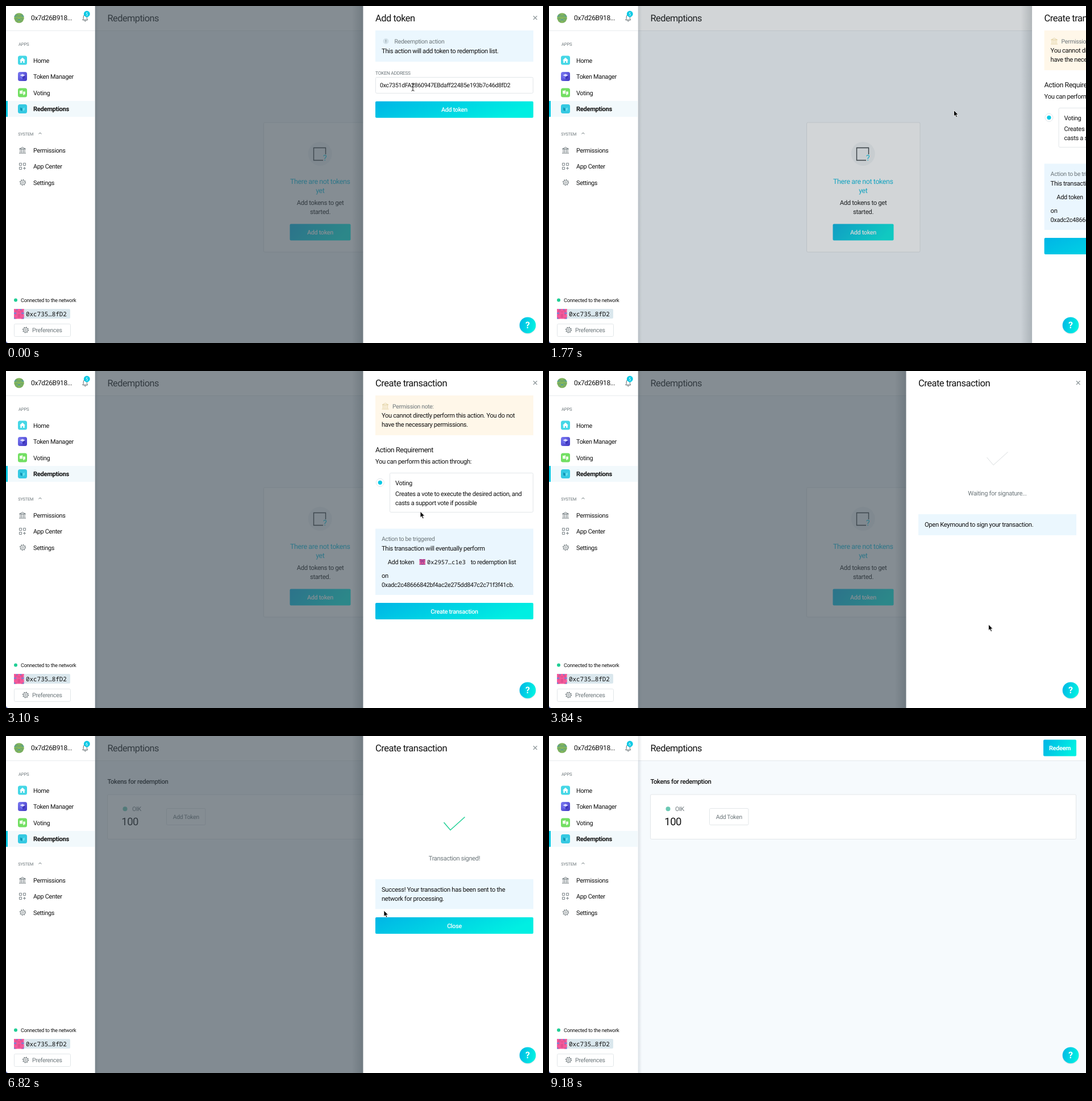
An HTML page for the animation above (9630 ms loop, 945 px wide and 593 px high).

```html
<!DOCTYPE html>
<html lang="en">
<head>
<meta charset="utf-8">
<title>Add a redemption token</title>
<style>
  html, body { margin: 0; width: 100%; height: 100%; overflow: hidden; background: #fff; }
  svg { display: block; width: 945px; height: 593px; }
  text {
    font-family: Roboto, "Open Sans", sans-serif;
    letter-spacing: -.03em;
    text-rendering: geometricPrecision;
    white-space: pre;
  }
  .mono { font-family: "Noto Sans Mono", "DejaVu Sans Mono", monospace; letter-spacing: 0; }
</style>
</head>
<body>
<svg id="stage" viewBox="0 0 945 593" xmlns="http://www.w3.org/2000/svg"></svg>
<script>
const LOOP = 9630, STEP = 148.1;
const PANEL_X = 628.5, PANEL_TRAVEL = 351.5, OVERLAY = 0.65;
const INK = '#111', GREY = '#6d777b', CYAN = '#00c8e4', BORDER = '#e2e6e9', INFO = '#ebf7fe';
const ORG = '0x7d26B918...';
const ACCOUNT = '0xc7351dFA2860947EBdaff22485e193b7c46d8fD2';
const TOKEN = '0x2957b64d27c2ae583818b6d97ac37ad8b5f1c1e3';
const APP = '0xadc2c48666842bf4ac2e275dd847c2c71f3f41cb';
const abbreviate = a => a.slice(0, 6) + '…' + a.slice(-4);

// Markup helpers
const text = (x, y, size, str, fill = INK, extra = '') =>
  `<text x="${x}" y="${y}" font-size="${size}" fill="${fill}" ${extra}>${str}</text>`;
const centred = (x, y, size, str, fill, extra = '') =>
  text(x, y, size, str, fill, `text-anchor="middle" ${extra}`);
const rect = (x, y, w, h, fill, extra = '') =>
  `<rect x="${x}" y="${y}" width="${w}" height="${h}" fill="${fill}" ${extra}/>`;
const circle = (x, y, r, fill, extra = '') =>
  `<circle cx="${x}" cy="${y}" r="${r}" fill="${fill}" ${extra}/>`;
const line = (d, stroke, width = 1, extra = '') =>
  `<path d="${d}" fill="none" stroke="${stroke}" stroke-width="${width}" ${extra}/>`;
const outline = (x, y, w, h, extra = '') =>
  rect(x, y, w, h, '#fff', `stroke="${BORDER}" rx="2" ${extra}`);
const group = (id, body, extra = '') => `<g id="${id}" ${extra}>${body}</g>`;
const at = (x, y, body) => `<g transform="translate(${x} ${y})">${body}</g>`;
const button = (x, y, w, h, label, extra = '') =>
  rect(x, y, w, h, 'url(#accent)', 'rx="2"') +
  centred(x + w / 2, y + h / 2 + 4, 10.8, label, '#fff', extra || 'font-weight="500"');

// Mirrored block pattern from a seeded generator
function identicon(x, y, size, colours, seed) {
  const cell = size / 8;
  let out = rect(x, y, size, size, colours[0]);
  for (let i = 0; i < 32; i++) {
    seed = (seed * 16807) % 2147483647;
    const colour = colours[seed % 4];
    if (!colour) continue;
    const cx = i % 4, cy = i >> 2;
    for (const c of [cx, 7 - cx])
      out += rect(x + c * cell, y + cy * cell, cell, cell, colour);
  }
  return out;
}
const PINK = ['#f45a9c', '#5c8fe0', null, '#e0508f'];

const gear = (x, y, r = 4) => at(x, y,
  circle(0, 0, r, 'none', `stroke="${GREY}"`) +
  circle(0, 0, r + 1, 'none', `stroke="${GREY}" stroke-width="1.3" stroke-dasharray="${r * .39} ${r * .592}"`) +
  circle(0, 0, 1.6, 'none', `stroke="${GREY}" stroke-width=".9"`));
const bank = (x, y, colour) => at(x, y,
  line('M-5.5 -2.5L0 -5.5L5.5 -2.5ZM-4 -2V4M-1.4 -2V4M1.4 -2V4M4 -2V4M-6 5H6', colour));
const grid = (x, y) => at(x, y,
  line('M-5.5 -5.5h4v4h-4ZM1.5 -5.5h4v4h-4ZM-5.5 1.5h4v4h-4ZM3.5 1v5M1 3.5h5', GREY, .9));

function sidebar() {
  const appIcon = (y, fill, glyph) => rect(21, y - 8, 16, 16, fill, 'rx="3.5"') + at(29, y, glyph);
  const item = (y, label, extra = '', size = 10.9) => text(48, y + 4, size, label, INK, extra);
  return rect(0, 0, 156.5, 593, '#fff') +
    line('M0 43.5H156', '#e8ebee') +
    `<g clip-path="url(#avatar)">${identicon(14, 12, 18, ['#84b65c', '#4f9aa0', null, '#6fa76a'], 71)}</g>` +
    text(44, 25.3, 12, ORG) +
    line('M134.8 24.6h9l-1.4-2.2v-3.2a3.1 3.6 0 0 0-6.2 0v3.2ZM138 25.5a1.4 1.4 0 0 0 2.8 0', '#5c666a') +
    circle(142.3, 14, 5.4, CYAN) +
    centred(142.2, 16.8, 7.8, '5', '#fff', 'id="badge"') +
    text(22, 70, 7.7, 'APPS', GREY) +
    rect(0, 167, 156, 28, '#f2f9fc') + rect(0, 167, 3, 28, CYAN) +
    appIcon(95.5, '#45d7e6', '<path d="M-5 0L0 -4.8L5 0H3.7V4.5H1.2V1.4H-1.2V4.5H-3.7V0Z" fill="#fff"/>') +
    appIcon(124, 'url(#violet)', '<path d="M0 -4.6L4.6 -2.2L0 .2L-4.6 -2.2Z" fill="#dcdcff"/><path d="M-4.6 -1.5L0 .9V5L-4.6 2.6Z" fill="#6f70ef"/><path d="M4.6 -1.5L0 .9V5L4.6 2.6Z" fill="#3d35b8"/>') +
    appIcon(152.5, '#72df62', '<path d="M-5 -3.5h3.2l1-1.5 1 1.5V2h-5.2ZM1 -2H5V3H3.3L2.3 5L1 3Z" fill="#effde9"/>') +
    appIcon(181, '#35c9e2', '<path d="M-4 -2.5L0 -.8V4L-4 2.2Z" fill="#1397b8"/><path d="M4 -2.5L0 -.8V4L4 2.2Z" fill="#62e0ee"/>') +
    item(95.5, 'Home') + item(124, 'Token Manager') + item(152.5, 'Voting') +
    item(181, 'Redemptions', 'font-weight="600"', 11.2) +
    text(21.3, 228, 7.4, 'SYSTEM', GREY) + line('M57.5 225.2L60 223L62.5 225.2', GREY) +
    bank(29, 254, GREY) + grid(29, 282) + gear(29.5, 310.5) +
    item(253.7, 'Permissions') + item(282, 'App Center') + item(310.7, 'Settings') +
    circle(17, 517.5, 3, '#20ce95') + text(26, 520.7, 9.1, 'Connected to the network') +
    rect(14, 533, 99, 17, '#dae7ed', 'rx="2"') + identicon(14, 533, 17.5, PINK, 2024) +
    text(35, 545.5, 10.9, abbreviate(ACCOUNT), INK, 'class="mono"') +
    outline(14.5, 559.5, 99, 22) + gear(34.5, 570) + text(46, 574, 10.5, 'Preferences', GREY) +
    '<path d="M0 590L3 593H0Z" fill="#5663a8"/>';
}

const emptyState = () =>
  outline(453.5, 205, 199.5, 228) +
  circle(552.7, 260, 21, '#f1f4f6') +
  line('M558 271.5H541.5V249.5H562.5V261', '#30373a', 1.4) +
  text(558, 272, 14, '?', CYAN) +
  centred(552.8, 312.5, 12.4, 'There are not tokens', '#08bee0') +
  centred(552.8, 329, 12.4, 'yet', '#08bee0') +
  centred(553, 349.7, 11.3, 'Add tokens to get') + centred(553, 365.5, 11.3, 'started.') +
  button(499.5, 383.5, 107, 29, 'Add token');

const tokenList = () =>
  button(870, 6.5, 58, 29, 'Redeem', 'font-weight="600"') +
  text(178.5, 84, 11.3, 'Tokens for redemption', INK, 'font-weight="500"') +
  outline(178.5, 103, 749, 78.5) +
  circle(209.5, 128.3, 4, '#6cc9b4') + text(222, 132, 10.7, 'OIK', GREY) +
  text(203.3, 156.7, 18.5, '100') +
  outline(282.5, 127.5, 68.5, 29) + centred(316.8, 146, 10.4, 'Add Token', GREY);

const addScene = () =>
  text(650, 27, 16.5, 'Add token') +
  rect(650, 43, 278, 55, INFO) +
  circle(668.5, 62, 5, '#d3e2ea') + centred(668.4, 65, 8, '!', GREY) +
  text(683.5, 66, 10.5, 'Redeemption action', GREY) +
  text(661, 83.3, 11.3, 'This action will add token to redemption list.') +
  text(650, 121, 8.4, 'TOKEN ADDRESS', GREY) +
  outline(650.5, 125.5, 277, 28, 'id="field"') +
  rect(657, 131, 232, 17, '#b4d7fd', 'id="selection"') +
  text(658, 143, 10.6, ACCOUNT, INK, 'id="address"') +
  button(650, 167.7, 278, 29, 'Add token');

const createScene = () =>
  text(650, 27, 16.5, 'Create transaction') +
  rect(650, 43, 278, 70, '#fff7e9') + bank(667.5, 62, '#e2d2a5') +
  text(680, 65.5, 10.4, 'Permission note:', GREY) +
  text(661, 82.3, 11.2, 'You cannot directly perform this action. You do not') +
  text(661, 98, 11.2, 'have the necessary permissions.') +
  text(650, 143.2, 12.4, 'Action Requirement') +
  text(650, 163, 11.2, 'You can perform this action through:') +
  circle(658.3, 196.3, 7, '#fff', `stroke="${BORDER}"`) + circle(658.3, 196.3, 3.6, CYAN) +
  outline(675.5, 179.5, 252, 69) +
  text(685, 200.7, 11.1, 'Voting') +
  text(685, 220, 11.1, 'Creates a vote to execute the desired action, and') +
  text(685, 235.7, 11.1, 'casts a support vote if possible') +
  rect(650, 277.5, 278, 116.5, '#eaf6fe') +
  text(661, 299, 10.5, 'Action to be triggered', GREY) +
  text(661, 316.2, 11.2, 'This transaction will eventually perform') +
  text(671.7, 340, 11, 'Add token') + identicon(727.7, 331, 10, ['#d84b8c', '#7b3f9e', null, '#ee7aa8'], 99) +
  text(741, 340, 10.3, abbreviate(TOKEN), INK, 'class="mono"') +
  text(817.7, 340, 11, 'to redemption list') +
  text(661, 364, 11.2, 'on') + text(661, 380, 10.8, APP + '.') +
  button(650, 408, 278, 29, 'Create transaction');

const signingScene = (status, tick, width, lines) =>
  text(650, 27, 16.5, 'Create transaction') +
  line('M770.5 152L782 165.5L807.5 142.5', tick, width) +
  centred(789, 219.3, 11.1, status, GREY) +
  rect(650, 252, 278, 21.5 + 15.5 * lines.length, INFO) +
  lines.map((s, i) => text(661, 274.3 + 15.7 * i, 11.2, s)).join('');

const gradient = (id, stops, y2 = .25) =>
  `<linearGradient id="${id}" x1="0" y1="0" x2="1" y2="${y2}">${stops.map(([o, c, a = 1]) =>
    `<stop offset="${o}" stop-color="${c}" stop-opacity="${a}"/>`).join('')}</linearGradient>`;

const stage = document.getElementById('stage');
stage.innerHTML =
  '<defs>' +
  gradient('accent', [[0, '#00b5e6'], [1, '#00efe2']]) +
  gradient('violet', [[0, '#7c7cf5'], [1, '#3f35c0']], 1) +
  gradient('panelShade', [[0, '#1c2b33', 0], [1, '#1c2b33', .18]], 0) +
  gradient('sideShade', [[0, '#506070', .16], [1, '#506070', 0]], 0) +
  '<clipPath id="avatar"><circle cx="23" cy="21" r="8.7"/></clipPath></defs>' +
  rect(156, 0, 789, 593, '#f6fafd') + rect(156, 0, 789, 43, '#fff') + line('M156 43.5H945', '#e3e8ec') +
  text(178.5, 27, 16.3, 'Redemptions') +
  group('empty', emptyState()) + group('tokens', tokenList()) +
  rect(156.5, 0, 7, 593, 'url(#sideShade)') +
  rect(156.5, 0, 789, 593, '#445159', 'id="overlay"') +
  group('panel',
    rect(PANEL_X - 20, 0, 20, 593, 'url(#panelShade)') + rect(PANEL_X, 0, 317, 593, '#fff') +
    line('M928 17.5l6.5 6.5M934.5 17.5l-6.5 6.5', '#8b9498', 1.2) +
    group('add', addScene()) + group('create', createScene()) +
    group('waiting', signingScene('Waiting for signature...', '#d9dddf', 1,
      ['Open Keymound to sign your transaction.'])) +
    group('signed', signingScene('Transaction signed!', '#1fd095', 1.5,
      ['Success! Your transaction has been sent to the', 'network for processing.']) +
      button(650, 319, 278, 29, 'Close'))) +
  sidebar() +
  circle(918, 563, 14.5, '#506070', 'opacity=".12"') + circle(918, 561.7, 14.3, 'url(#accent)') +
  centred(917.8, 567.3, 16, '?', '#fff', 'font-weight="600"') +
  group('beam', line('M-2.5 -6Q0 -6 0 -4Q0 -6 2.5 -6M0 -4V5M-2.5 7Q0 7 0 5Q0 7 2.5 7', '#222'),
    'transform="translate(716 142.5)"') +
  group('arrow', '<path d="M0 0V10.6L2.4 8.4L4.2 12.4L6 11.6L4.3 7.8H7.6Z" fill="#000" stroke="#fff" stroke-width=".8"/>');

const $ = Object.fromEntries([...stage.querySelectorAll('[id]')].map(n => [n.id, n]));
const show = (node, on) => node.setAttribute('display', on ? 'inline' : 'none');

// Critically damped spring: 1 at the start, settling to 0
const settle = ms => { const x = Math.max(0, ms) / 100; return (1 + x) * Math.exp(-x); };
const CLOSE = 1372, REOPEN = 1686, DISMISS = 7516;
function openness(t) {
  if (t < REOPEN) return settle(t - CLOSE);
  if (t < DISMISS) return 1 - (1 - settle(REOPEN - CLOSE)) * settle(t - REOPEN);
  return settle(t - DISMISS);
}

// Pointer way points: time, x, y
const ROUTE = [
  [440, 716, 140], [1180, 712.5, 183.5], [2960, 712.5, 183.5], [3400, 774, 420], [3690, 774, 425],
  [3840, 773.5, 446], [4450, 773.5, 446], [4730, 745, 446], [6230, 745, 446], [6810, 665, 307],
  [7260, 681, 326], [7850, 681, 326], [8140, 664, 326], [8740, 664, 326], [9180, 822, 507]
];
function pointer(t) {
  const i = ROUTE.findIndex(p => p[0] > t);
  if (i < 1) return ROUTE[i ? ROUTE.length - 1 : 0].slice(1);
  const [a, b] = [ROUTE[i - 1], ROUTE[i]];
  const u = (t - a[0]) / (b[0] - a[0]), e = u * u * (3 - 2 * u);
  return [a[1] + (b[1] - a[1]) * e, a[2] + (b[2] - a[2]) * e];
}

function draw(t) {
  const scene = t < REOPEN ? 'add' : t < 3620 ? 'create' : t < 5760 ? 'waiting' : 'signed';
  for (const id of ['add', 'create', 'waiting', 'signed']) show($[id], id === scene);

  const p = openness(t);
  $.panel.setAttribute('transform', `translate(${(1 - p) * PANEL_TRAVEL} 0)`);
  show($.panel, p > .005);
  $.overlay.setAttribute('opacity', p > .005 ? p * OVERLAY : 0);

  const pasted = t > 290;
  $.address.textContent = pasted ? TOKEN : ACCOUNT;
  show($.selection, t > 140 && !pasted);
  $.field.setAttribute('stroke', t > 140 && t < 1330 ? CYAN : BORDER);

  const loaded = t > 6200;
  show($.empty, !loaded);
  show($.tokens, loaded);
  $.badge.textContent = loaded ? 6 : 5;

  show($.beam, t < 580);
  show($.arrow, t >= 580 && t < 9170);
  $.arrow.setAttribute('transform', `translate(${pointer(t)})`);
}

let start;
function tick(now) {
  start ??= now;
  draw(Math.floor(((now - start) % LOOP + 11) / STEP) * STEP);
  requestAnimationFrame(tick);
}
draw(0);
requestAnimationFrame(tick);
</script>
</body>
</html>
```
